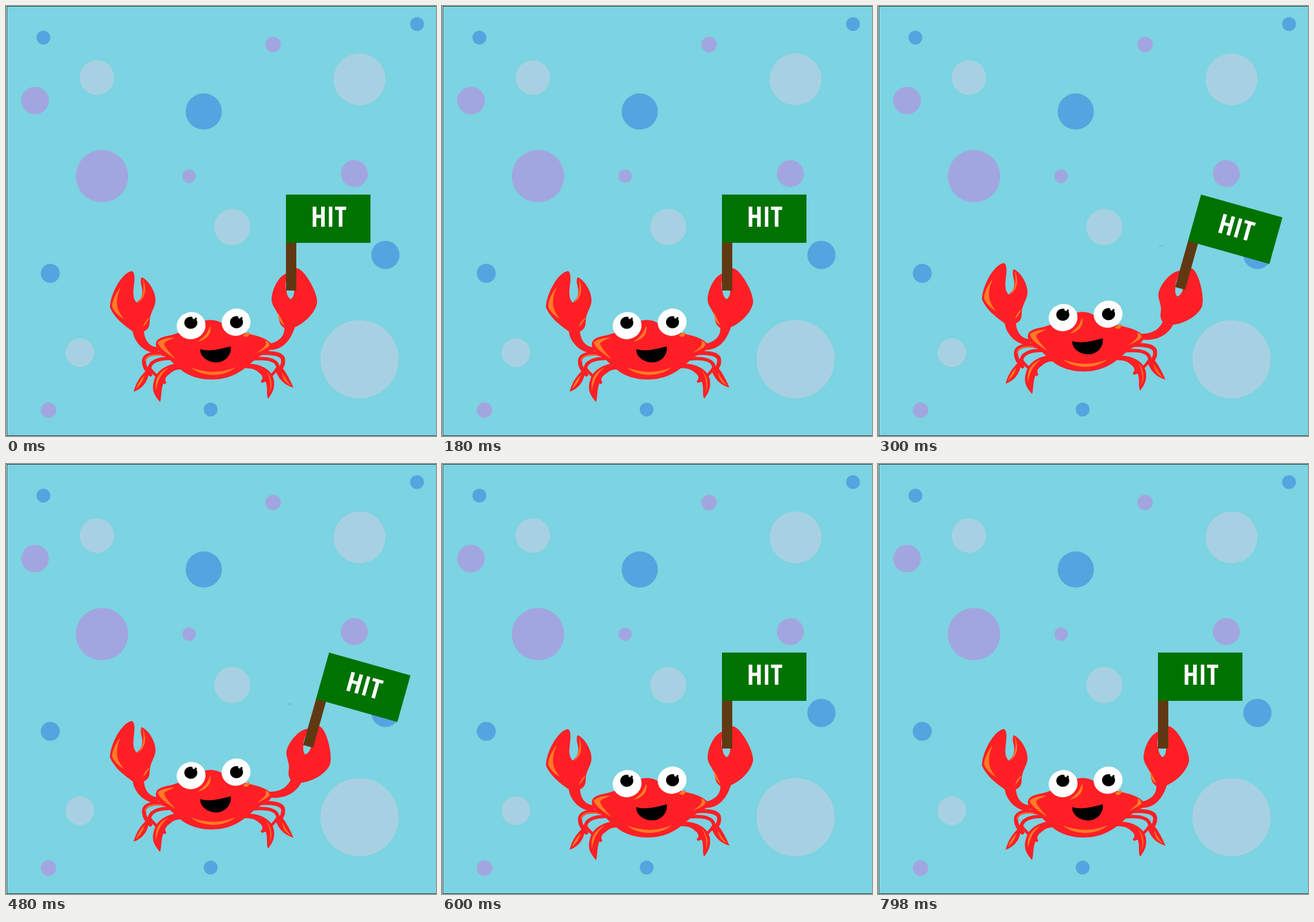
An HTML page with a canvas that plays this animation: 748x748 px, repeating every 0.93 s.

```html
<!DOCTYPE html>
<html lang="en">
<head>
<meta charset="utf-8">
<title>Crab with a flag</title>
<style>
html, body { margin: 0; width: 100%; height: 100%; overflow: hidden; background: #7cd3e1; }
canvas { display: block; width: 748px; height: 748px; }
</style>
</head>
<body>
<canvas id="stage" width="748" height="748"></canvas>
<script>
const ctx = document.getElementById("stage").getContext("2d");
const LOOP = 930, UP = 300, DOWN = 600;
const RED = "#ff1f25", ORANGE = "#ff7a26", SEA = "#7cd3e1";

const bubbles = {
  "#54a4e0": [[65, 55, 12], [715, 31.5, 12], [344, 183.5, 31.5], [660, 433, 24.5], [77, 465, 16.5], [356, 702, 12]],
  "#a2a6e0": [[464.5, 67, 13.5], [50.5, 164.5, 24], [167, 296, 45.5], [318.5, 296, 11.5], [606, 291.5, 23.5], [74, 703, 13.5]],
  "#a7d1e2": [[158, 124.5, 30], [615, 127.5, 45], [393.5, 384.5, 31.5], [128.5, 603, 25], [615, 614.5, 68]]
};

function fill(color, d) {
  ctx.fillStyle = color;
  ctx.fill(new Path2D(d));
}

function line(color, width, d) {
  ctx.strokeStyle = color;
  ctx.lineWidth = width;
  ctx.stroke(new Path2D(d));
}

function oval(color, x, y, rx, ry = rx, turn = 0) {
  ctx.fillStyle = color;
  ctx.beginPath();
  ctx.ellipse(x, y, rx, ry, turn, 0, Math.PI * 2);
  ctx.fill();
}

function box(color, x, y, w, h) {
  ctx.fillStyle = color;
  ctx.fillRect(x, y, w, h);
}

function sea() {
  box(SEA, 0, 0, 748, 748);
  for (const color in bubbles)
    for (const [x, y, r] of bubbles[color]) oval(color, x, y, r);
  box("#f4fbfc", 0, 0, 1, 748);
  box("#26383c", 1, 0, 1, 748);
  box("#26383c", 1, 0, 747, 1);
  box("#26383c", 1, 747, 747, 1);
}

function legs() {
  ctx.lineCap = "round";
  // left
  line(RED, 7, "M278 606C258 602 240 606 240 618C240 628 245 634 251 641");
  line(RED, 6, "M292 613C264 612 250 618 249 632");
  line(RED, 5, "M249 629C257 641 267 648 276 655");
  fill(RED, "M243 635C232 646 226 656 222 671C236 666 245 656 248 641Z");
  fill(RED, "M302 621C280 623 263 633 258 650C252 668 258 677 268 689C271 680 269 668 274 656L279 656C275 649 278 644 286 639C292 633 298 632 308 632Z");
  fill(ORANGE, "M241 643C235 648 230 656 226 666C233 660 238 653 241 643Z");
  fill(ORANGE, "M283 629C266 636 258 650 261 668C264 653 268 640 283 629Z");
  line(ORANGE, 1.5, "M270 607C254 605 243 609 242 617");
  // right
  line(RED, 7, "M440 604C462 602 481 605 482 615C483 624 479 629 473 635");
  line(RED, 6, "M428 614C456 611 474 616 473 631");
  line(RED, 5, "M472 630C465 642 456 648 446 653");
  fill(RED, "M480 628C489 640 495 652 500 664C487 660 477 653 470 637Z");
  fill(RED, "M416 622C440 621 462 631 466 650C468 664 464 673 456 683C452 676 456 665 452 654L443 653C449 648 446 642 440 638C432 630 424 630 412 630Z");
  fill(ORANGE, "M480 637C485 647 490 654 496 660C488 657 482 650 480 637Z");
  fill(ORANGE, "M452 634C462 645 464 658 459 673C461 659 460 647 452 634Z");
}

function leftClaw() {
  fill(RED, "M219 461C224 463 224 474 223 482C221 497 220 508 227 516C236 510 239 500 236 488C233 477 235 471 237 472C250 479 261 499 260 514C259 525 250 535 250 548C250 558 247 563 240 566C241 580 248 593 266 594L264 604C245 604 231 592 224 578C220 569 222 567 219 565C208 557 190 545 181 525C180 505 200 464 219 461Z");
  fill(ORANGE, "M200 488C189 502 182 519 186 526C191 535 198 540 206 545C190 527 190 511 200 488Z");
  fill(ORANGE, "M238 475C246 493 242 508 229 517C239 505 241 493 238 475Z");
  fill(ORANGE, "M250 542C244 545 240 552 238 559C243 553 247 548 250 542Z");
}

function eye(x, y, px, py) {
  oval("#fff", x, y, 25.2, 23.6, -0.25);
  oval("#000", px, py, 11.3, 10.5);
  oval("#fff", px + 6, py - 9, 3.2, 2.8);
  oval("#000", px + 8.5, py - 7, 2);
}

function body() {
  fill(RED, "M262 583C266 577 275 575 285 573C300 570 320 560 333 553C343 547 355 544 368 548C380 553 400 566 425 571C445 575 458 582 462 588C464 594 458 602 445 607C430 615 420 630 400 640C375 653 340 653 315 640C300 632 290 618 275 608C263 600 258 592 262 583Z");
  fill(ORANGE, "M264 585C271 579 282 577 293 577C284 581 276 583 275 588C279 598 288 606 295 614C282 606 266 595 264 585Z");
  fill(ORANGE, "M322 629C350 639 375 639 400 628C380 646 342 646 322 629Z");
  fill(ORANGE, "M451 582C459 584 460 590 456 593C450 597 446 599 436 604C446 595 455 592 451 582Z");
  fill(ORANGE, "M355 556C359 568 350 581 333 584C345 576 351 569 355 556Z");
  fill(ORANGE, "M412 573C417 569 421 567 424 568C423 576 418 578 412 573Z");
  eye(322, 556, 321.5, 551);
  eye(400.3, 550, 401, 550);
  fill("#000", "M338 597C355 602 375 596 391 592C393 607 381 620 366 620C350 620 337 609 338 597Z");
}

// Drawn relative to the flag's upper left corner
function clawAndFlag(raised) {
  ctx.save();
  ctx.translate(raised ? 562 : 487, 328);
  if (raised) ctx.rotate(15.7 * Math.PI / 180);
  ctx.save();
  ctx.translate(-487, -328);
  fill(RED, "M505 456C518 456 540 495 541 512C543 523 528 548 502 559C498 561 490 562 484 560C474 554 476 545 473 536C468 525 462 520 462 510C463 492 474 470 488 465C488 475 484 487 488 497C489 504 492 508 495 510C500 507 502 500 501 490C499 475 500 460 505 456Z");
  if (!raised) fill(ORANGE, "M473 533C473 543 477 551 484 556C481 547 477 541 473 533Z");
  ctx.restore();
  box("#603913", 0, 83, 18, 84);
  box("#007200", 0, 0, 147, 84);
  ctx.fillStyle = "#fff";
  ctx.font = 'bold 47.6px "Open Sans Condensed", "Open Sans", "Liberation Sans Narrow", sans-serif';
  ctx.fontStretch = "extra-condensed";
  ctx.textAlign = "center";
  ctx.fillText("HIT", 74.5, 55.5);
  ctx.restore();
}

function crab(raised) {
  ctx.save();
  if (raised) ctx.translate(0, -14);
  legs();
  leftClaw();
  ctx.restore();
  fill(RED, raised
    ? "M496 547C491 561 478 572 452 570L455 580C485 584 505 572 514 553Z"
    : "M484 556C486 572 478 584 456 588L456 598C482 600 496 580 503 557Z");
  ctx.save();
  if (raised) ctx.translate(0, -14);
  body();
  ctx.restore();
  clawAndFlag(raised);
}

function draw(now) {
  const t = now % LOOP;
  const raised = t >= UP && t < DOWN;
  sea();
  if (raised) box("#5fb0c4", 488, 417, 8, 1);
  crab(raised);
}

const start = performance.now();
function tick() {
  draw(performance.now() - start);
  requestAnimationFrame(tick);
}
tick();
</script>
</body>
</html>
```
